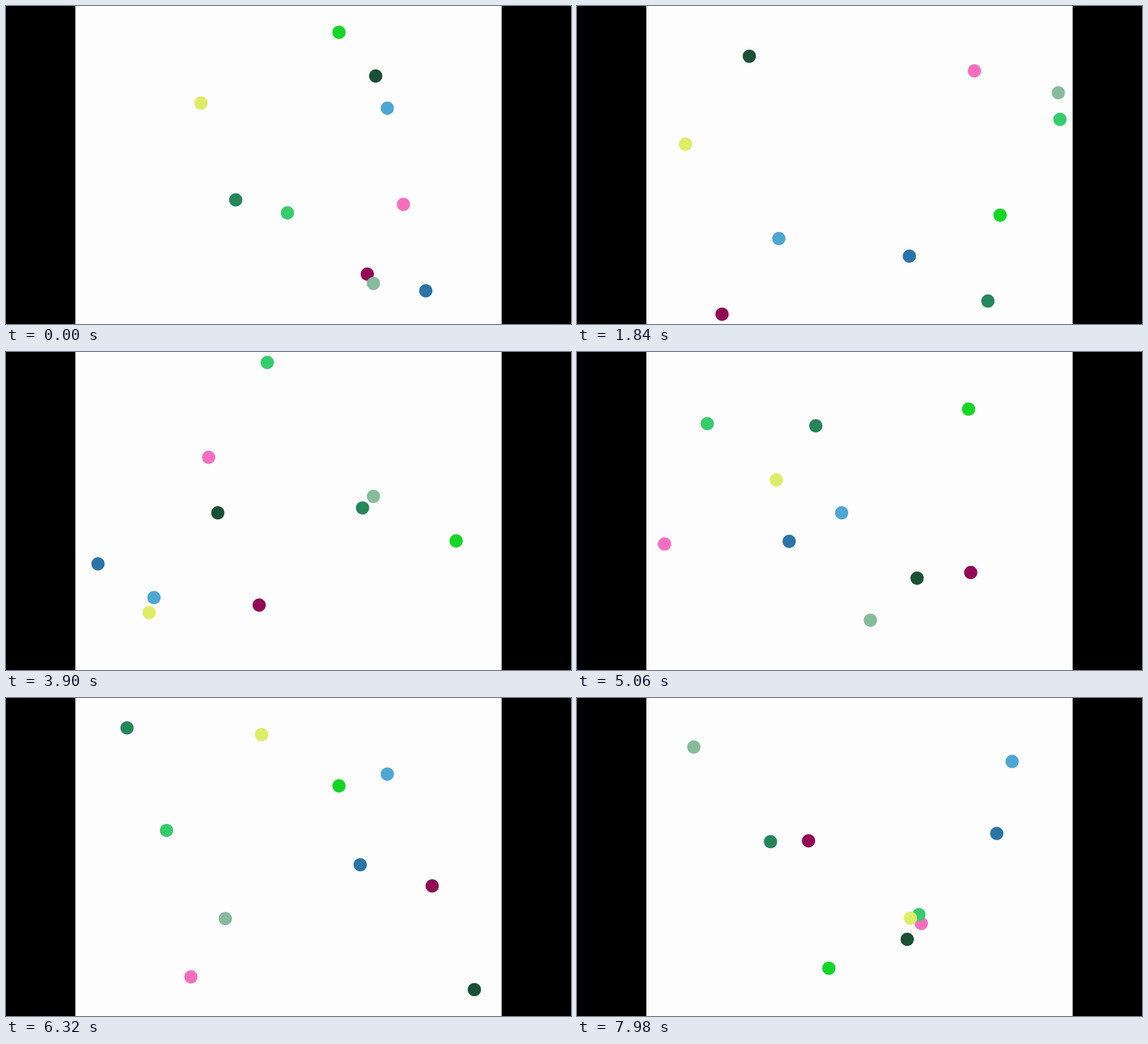
These frames come from a looping animation (998x561 px, 8000 ms). An HTML page with a canvas:

```html
<!DOCTYPE html>
<html lang="en">
<head>
<meta charset="utf-8">
<title>Bouncing balls</title>
<style>
  html, body { margin: 0; width: 100%; height: 100%; overflow: hidden; background: #000; }
  canvas { display: block; }
</style>
</head>
<body>
<canvas id="stage" width="998" height="561"></canvas>
<script>
const ctx = document.getElementById("stage").getContext("2d");
const LOOP = 8000;
const RADIUS = 11.7;
const BOX = { left: 122.5, width: 753 };
const LIMIT = { left: 133.5, right: 864.3, top: 11, bottom: 553 };
const TOP_PUSH = 0.6;

// Back to front: colour, start x, start y, speed x, speed y (pixels per step)
const BALLS = [
  ["#13d626", 588.2, 46.5, 7.96, -17.88],
  ["#1a5036", 653, 123.5, -17.43, -8.87],
  ["#4da6d4", 673.5, 180.3, -15.85, 11.5],
  ["#26865a", 405.8, 342, 16, 11.15],
  ["#f66fbf", 702, 350, 15.64, -11.78],
  ["#35cc6c", 497.1, 365, 17.8, -8.25],
  ["#deec67", 344.5, 171.2, -7.64, -18],
  ["#920a55", 638.2, 473, -19.1, 4.42],
  ["#86bb9b", 649, 489.5, 10.06, -16.82],
  ["#2b74a8", 741.5, 502.5, 19.3, -3.064],
];

// Screen updates come in bursts of three (20, 20 and 100 ms); every second one moves the balls.
function stepAt(ms) {
  const shifted = ms + 20;
  const phase = shifted % 140;
  const updates = 3 * Math.floor(shifted / 140) + (phase >= 20) + (phase >= 40);
  return Math.floor(updates / 2);
}

// A ball turns back before a move that would take it past a wall.
function positionAfter(steps, [, x, y, vx, vy]) {
  for (let i = 0; i < steps; i++) {
    if (x + vx < LIMIT.left || x + vx > LIMIT.right) vx = -vx;
    if (y + vy < LIMIT.top) {
      vy = -vy;
      y += TOP_PUSH;
    } else if (y + vy > LIMIT.bottom) {
      vy = -vy;
    }
    x += vx;
    y += vy;
  }
  return [x, y];
}

function draw(ms) {
  const steps = stepAt(ms);
  ctx.fillStyle = "#000";
  ctx.fillRect(0, 0, 998, 561);
  ctx.fillStyle = "#fdfdfd";
  ctx.fillRect(BOX.left, 0, BOX.width, 561);
  for (const ball of BALLS) {
    const [x, y] = positionAfter(steps, ball);
    ctx.fillStyle = ball[0];
    ctx.beginPath();
    ctx.arc(x, y, RADIUS, 0, 2 * Math.PI);
    ctx.fill();
  }
}

const start = performance.now();
function tick() {
  draw((performance.now() - start) % LOOP);
  requestAnimationFrame(tick);
}
tick();
</script>
</body>
</html>
```
